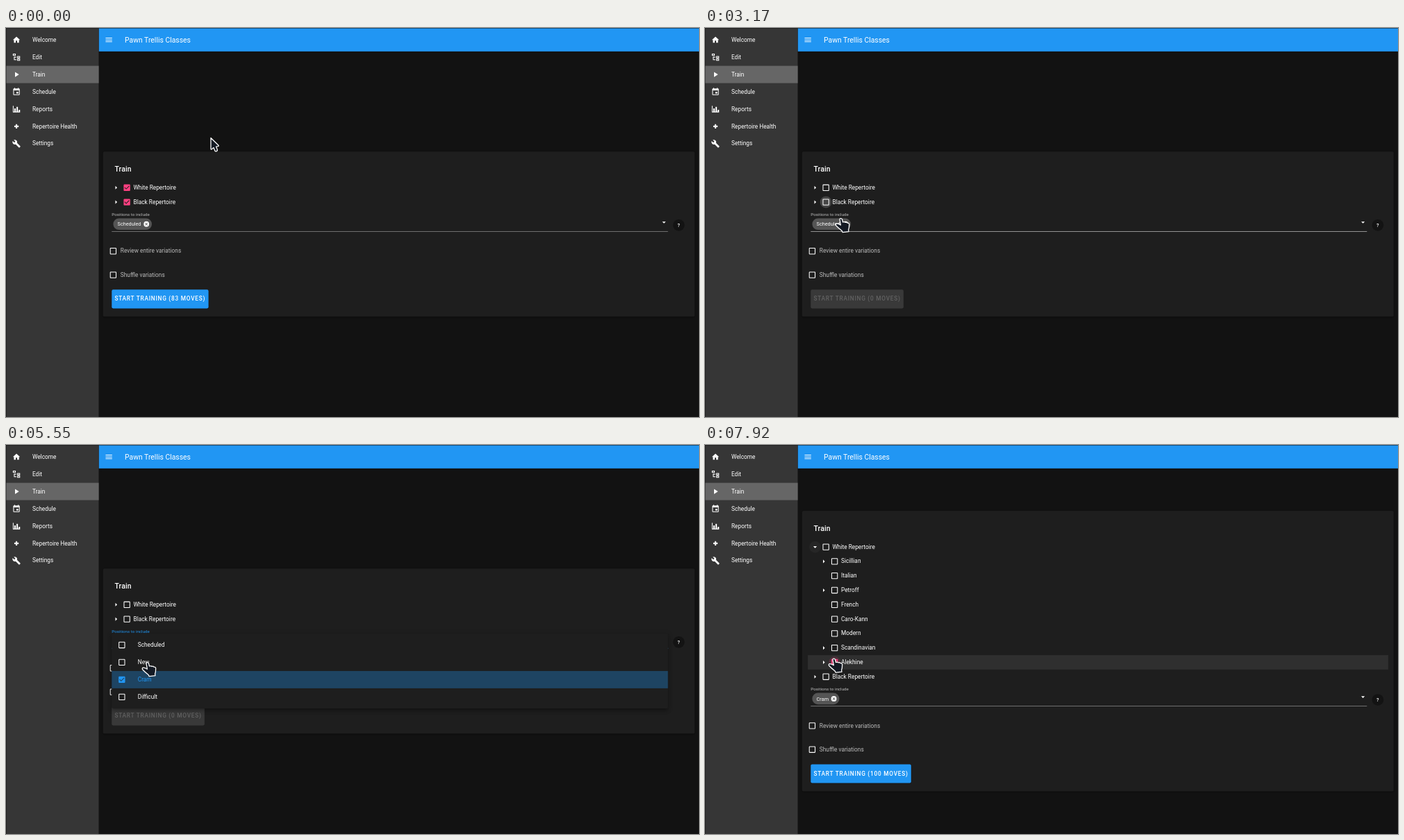
Recreate the animation shown at these times as an HTML page. Size 998 by 561 pixels, loop 8 s.

```html
<!DOCTYPE html>
<html lang="en">
<head>
<meta charset="utf-8">
<title>Train</title>
<style>
  html, body { margin: 0; width: 100%; height: 100%; overflow: hidden; background: #0c0c0c; }
  /* Interface is laid out at 1920 x 1080 and scaled to the stage */
  #app { position: absolute; left: 0; top: 0; width: 1920px; height: 1080px; transform: scale(.519792);
    transform-origin: 0 0; font: 16px/24px Roboto, sans-serif; color: #fff; }
  #app div, #app span.abs { position: absolute; white-space: nowrap; }
  svg { display: block; width: 24px; height: 24px; fill: currentColor; fill-rule: evenodd; }
  .main { left: 257px; top: 1px; width: 1663px; height: 1079px; background: #121212; }
  .drawer { left: 1px; top: 1px; width: 256px; height: 1079px; background: #363636; }
  .nav { left: 0; width: 256px; height: 48px; line-height: 48px; }
  .nav.on { background: #666; }
  .nav svg { position: absolute; left: 16px; top: 12px; }
  .nav span { position: absolute; left: 72px; }
  .bar { left: 257px; top: 1px; width: 1663px; height: 64px; background: #2196f3;
    box-shadow: 0 2px 4px -1px #0003, 0 4px 5px #0002; }
  .bar svg { position: absolute; left: 16px; top: 20px; }
  .bar span { position: absolute; left: 72px; font-size: 20px; line-height: 64px; }
  .card { left: 269px; width: 1639px; background: #1e1e1e; border-radius: 4px;
    box-shadow: 0 3px 1px -2px #0003, 0 2px 2px #0002, 0 1px 5px #0002; }
  .title { left: 32px; top: 32px; font-size: 20px; line-height: 32px; font-weight: 500; letter-spacing: .2px; }
  .row { left: 16px; width: 1608px; height: 40px; line-height: 40px; }
  .row .bg { inset: 0; background: #fff; opacity: 0; }
  .row .tog, .row .box { top: 8px; width: 24px; height: 24px; }
  .ring { inset: -3.6px; border-radius: 50%; background: currentColor; opacity: 0; }
  .row .text { top: 0; }
  .rest { left: 0; width: 1639px; height: 298px; }
  .label { left: 24px; top: 4px; font-size: 12px; line-height: 20px; }
  .chip { left: 28px; top: 25px; height: 32px; padding: 0 12px; border-radius: 16px; background: #555;
    font-size: 14px; line-height: 32px; display: flex; align-items: center; }
  .chip svg { width: 18px; height: 18px; margin: 0 -6px 0 6px; }
  .line { left: 24px; top: 61px; width: 1541px; height: 1px; background: #fff; }
  .focus { left: 24px; top: 60px; width: 1541px; height: 2px; }
  .arrow { left: 1542px; top: 23.5px; width: 24px; height: 24px; }
  .help { left: 1579px; top: 27.5px; width: 32px; height: 32px; border-radius: 50%; background: #131313;
    font-size: 14px; font-weight: 500; line-height: 32px; text-align: center; }
  .check { left: 16px; height: 24px; }
  .check span { position: absolute; left: 32px; top: 0; color: #bbb; }
  .btn { left: 24px; top: 223px; height: 52px; padding: 0 8px; border-radius: 4px; font-weight: 500;
    line-height: 52px; letter-spacing: .0892857em; background: #2196f3;
    box-shadow: 0 3px 1px -2px #0003, 0 2px 2px #0002; }
  .btn.off { background: #393939; color: #626262; box-shadow: none; }
  .menu { left: 293px; top: 523px; width: 1541px; height: 208px; border-radius: 4px; background: #1e1e1e;
    box-shadow: 0 5px 5px -3px #0003, 0 8px 10px 1px #0002, 0 3px 14px 2px #0002; }
  .item { left: 0; width: 1541px; height: 48px; line-height: 48px; }
  .item .bg { inset: 0; background: currentColor; opacity: 0; }
  .item .box { left: 16px; top: 12px; }
  .item span { position: absolute; left: 72px; }
  #cursor { position: absolute; left: 0; top: 0; width: 998px; height: 561px; }
  #cursor path { fill: #141a24; stroke: #fff; stroke-width: 1.25; stroke-linejoin: round; }
</style>
</head>
<body>
<div id="app"></div>
<svg id="cursor" viewBox="0 0 998 561">
  <path id="arrow" d="M0 .5V16.6Q.4 17.6 1.4 16.8L4 14.6L5.6 18.6Q6.6 20.6 8.4 19.6Q10 18.8 9.2 17L7.6 13L10.6 12.6Q11.8 12 10.8 11Z"/>
  <path id="hand" d="M-2 1.2Q-2.2 -.4 -.4 -.5Q1.1 -.5 1.5 1L2.5 5Q5 4.1 6 5.4Q8.2 4.8 9 6.2Q11.4 5.8 11.7 8L11.4 13L10.6 16.2L11 18.6L2.2 19.6L1.2 17.6Q-4 13.4 -7.4 9.8Q-8.4 7.8 -6.6 7.1Q-4.4 6.8 -.6 9.2Z"/>
</svg>
<script>
const SCALE = 998 / 1920, LOOP = 8000;
const BLUE = '#2196f3', PINK = '#ff4081';
const frame = 'M19 3H5a2 2 0 0 0-2 2v14a2 2 0 0 0 2 2h14a2 2 0 0 0 2-2V5a2 2 0 0 0-2-2Z';
const icons = {
  home: 'M10 20V14H14V20H19V12H22L12 3L2 12H5V20Z',
  tree: 'M12 13H7V18H12V20H5V10H7V11H12ZM8 4V6H4V4ZM10 2H2V8H10ZM20 11V13H16V11ZM22 9H14V15H22ZM20 18V20H16V18ZM22 16H14V22H22Z',
  play: 'M8 5V19L19 12Z',
  date: 'M19 19H5V8H19ZM16 1V3H8V1H6V3H5a2 2 0 0 0-2 2V19a2 2 0 0 0 2 2H19a2 2 0 0 0 2-2V5a2 2 0 0 0-2-2H18V1ZM17 12H12V17H17Z',
  chart: 'M22 21H2V3H4V19H6V10H10V19H12V6H16V19H18V14H22Z',
  plus: 'M18 14H14V18H10V14H6V10H10V6H14V10H18Z',
  wrench: 'M22.7 19L13.6 9.9C14.5 7.6 14 4.9 12.1 3C10.1 1 7.1 .6 4.7 1.7L9 6L6 9L1.6 4.7C.4 7.1 .9 10.1 2.9 12.1C4.8 14 7.5 14.5 9.8 13.6L18.9 22.7Q19.6 23.3 20.3 22.7L22.6 20.4Q23.3 19.7 22.7 19Z',
  menu: 'M3 6H21V8H3ZM3 11H21V13H3ZM3 16H21V18H3Z',
  down: 'M7 10L12 15L17 10Z',
  close: 'M12 2a10 10 0 1 0 0 20a10 10 0 1 0 0-20ZM15.6 7L12 10.6L8.4 7L7 8.4L10.6 12L7 15.6L8.4 17L12 13.4L15.6 17L17 15.6L13.4 12L17 8.4Z',
  blank: frame + 'm0 2v14H5V5Z',
  tick: frame + 'M10 17l-5-5 1.4-1.4 3.6 3.6 7.6-7.6L19 8Z'
};
const icon = name => `<svg viewBox="0 0 24 24"><path d="${icons[name]}"/></svg>`;

const nav = [['home', 'Welcome'], ['tree', 'Edit'], ['play', 'Train'], ['date', 'Schedule'],
  ['chart', 'Reports'], ['plus', 'Repertoire Health'], ['wrench', 'Settings']];
// name, depth, has children
const rows = [['White Repertoire', 0, 1], ['Sicillian', 1, 1], ['Italian', 1, 0], ['Petroff', 1, 1],
  ['French', 1, 0], ['Caro-Kann', 1, 0], ['Modern', 1, 0], ['Scandinavian', 1, 1],
  ['Alekhine', 1, 1], ['Black Repertoire', 0, 1]];
const WHITE = 0, ALEKHINE = 8, BLACK = 9;
const options = ['Scheduled', 'New', 'Cram', 'Difficult'];

const rowHtml = ([name, depth, kids]) => {
  const x = 8 + depth * 24;
  return `<div class="row"><div class="bg"></div>
    <div class="tog" style="left:${x}px"><div class="ring"></div><div class="pic">${kids ? icon('down') : ''}</div></div>
    <div class="box" style="left:${x + 30}px"><div class="ring"></div><div class="pic"></div></div>
    <div class="text" style="left:${x + 60}px">${name}</div></div>`;
};
const app = document.getElementById('app');
app.innerHTML = `
  <div class="main"></div>
  <div class="bar">${icon('menu')}<span>Pawn Trellis Classes</span></div>
  <div class="drawer">${nav.map(([pic, name], i) =>
    `<div class="nav ${i === 2 ? 'on' : ''}" style="top:${8 + i * 48}px">${icon(pic)}<span>${name}</span></div>`).join('')}</div>
  <div class="card"><div class="title">Train</div>${rows.map(rowHtml).join('')}
    <div class="rest">
      <div class="label">Positions to include</div>
      <div class="chip"><b style="font-weight:400"></b>${icon('close')}</div>
      <div class="line"></div><div class="focus"></div>
      <div class="arrow">${icon('down')}</div><div class="help">?</div>
      <div class="check" style="top:103.5px">${icon('blank')}<span>Review entire variations</span></div>
      <div class="check" style="top:169.5px">${icon('blank')}<span>Shuffle variations</span></div>
      <div class="btn"></div>
    </div></div>
  <div class="menu">${options.map((name, i) =>
    `<div class="item" style="top:${8 + i * 48}px"><div class="bg"></div><div class="box"></div><span>${name}</span></div>`).join('')}</div>`;

const $ = q => app.querySelector(q);
const card = $('.card'), rest = $('.rest'), label = $('.label'), chip = $('.chip'), chipText = $('.chip b'),
  line = $('.line'), focusLine = $('.focus'), arrow = $('.arrow'), btn = $('.btn'), menu = $('.menu');
const rowEls = [...app.querySelectorAll('.row')].map(el => ({
  el, bg: el.querySelector('.bg'),
  tog: el.querySelector('.tog .pic'), togRing: el.querySelector('.tog .ring'),
  box: el.querySelector('.box'), pic: el.querySelector('.box .pic'), ring: el.querySelector('.box .ring')
}));
const items = [...app.querySelectorAll('.item')].map(el => ({
  el, bg: el.querySelector('.bg'), box: el.querySelector('.box')
}));

const clamp = v => Math.max(0, Math.min(1, v));
const out = (t, from, power) => 1 - (1 - clamp((t - from) / 300)) ** power;
const mix = (k, rest) => `color-mix(in srgb, ${BLUE} ${(k * 100).toFixed(1)}%, ${rest})`;
const pulse = (t, from, to) => clamp((t - from) / 150) - clamp((t - to) / 150);

// time, x, y, 1 = linear on the way to the next point
const path = [[0, 295, 158], [430, 295, 158], [1170, 179.5, 222.5], [1490, 179.5, 222.5],
  [1550, 177, 223.3], [1650, 177, 223.3], [1800, 175.3, 224.5], [1980, 175.3, 224.5],
  [2380, 174.5, 247], [2720, 174.5, 247], [3170, 196, 275], [3260, 196, 275], [3420, 203, 281.5],
  [4300, 203, 281.5], [4590, 203, 305.5], [4770, 203, 305.5], [4880, 210.5, 344],
  [5400, 210.5, 344, 1], [5550, 204, 314, 1], [6050, 165, 232.5], [6130, 162, 230],
  [6260, 162, 230], [6340, 160, 229], [6660, 160, 229, 1], [7090, 169, 295.5, 1],
  [7380, 186, 308.5], [LOOP, 186, 308.5]];
function tip(t) {
  let i = 0;
  while (i < path.length - 2 && t >= path[i + 1][0]) i++;
  const [t0, x0, y0, linear] = path[i], [t1, x1, y1] = path[i + 1];
  let p = clamp((t - t0) / (t1 - t0));
  if (!linear) p = p * p * (3 - 2 * p);
  return [x0 + (x1 - x0) * p, y0 + (y1 - y0) * p];
}

const OPEN = 6455;
const shown = (i, t) => t >= OPEN || !rows[i][1];
function target(t) {
  const y = tip(t)[1] / SCALE, top = t >= OPEN ? 263 : 423;
  const list = rows.map((_, i) => i).filter(i => shown(i, t));
  const n = Math.floor((y - top) / 40);
  if (n >= 0 && n < list.length) return list[n];
  return n >= 0 && y < top + list.length * 40 + 62 ? 'field' : null;
}

function setBox(el, on, color) {
  el.style.color = on ? color : '#fff';
  const html = icon(on ? 'tick' : 'blank');
  if (el.dataset.on !== String(on)) { el.dataset.on = on; return html; }
}

function draw(t) {
  const open = t >= OPEN, count = open ? 10 : 2;
  card.style.top = (open ? 183 : 343) + 'px';
  card.style.height = 378 + count * 40 + 'px';
  rest.style.top = 80 + count * 40 + 'px';

  // hover fades over 200 ms
  const hover = {};
  for (let k = 0; k < 10; k++) {
    const id = target(Math.max(0, t - k * 20));
    hover[id] = (hover[id] || 0) + .1;
  }
  const checked = { [WHITE]: t < 1920, [BLACK]: t < 2700, [ALEKHINE]: t >= 7900 };
  const rings = { [WHITE]: pulse(t, 1830, 2630), [BLACK]: pulse(t, 2630, 3630), [ALEKHINE]: 1.6 * pulse(t, 7840, 9000) };
  let n = 0;
  rowEls.forEach((r, i) => {
    const on = shown(i, t);
    r.el.style.display = on ? '' : 'none';
    if (on) r.el.style.top = 80 + 40 * n++ + 'px';
    r.bg.style.opacity = .075 * (hover[i] || 0);
    r.tog.style.transform = open && i === WHITE ? '' : 'rotate(-90deg)';
    const html = setBox(r.box, !!checked[i], PINK);
    if (html) r.pic.innerHTML = html;
    r.ring.style.opacity = .18 * (rings[i] || 0);
    r.togRing.style.opacity = i === WHITE ? .2 * pulse(t, 6300, 7800) : 0;
  });

  const focus = out(t, 3640, 3) - out(t, OPEN, 3);
  const menuOn = out(t, 4250, 4) - out(t, OPEN, 4);
  label.style.color = mix(focus, '#bbb');
  arrow.style.color = mix(focus, '#fff');
  arrow.style.transform = `rotate(${180 * (out(t, 4250, 3) - out(t, OPEN, 3))}deg)`;
  line.style.opacity = .7 + .3 * (hover.field || 0);
  focusLine.style.transform = `scaleX(${focus})`;
  focusLine.style.background = mix(focus, '#bde0fa');
  const tag = t < 3680 ? 'Scheduled' : t >= 5400 ? 'Cram' : '';
  chip.style.display = tag ? '' : 'none';
  chipText.textContent = tag;

  const moves = t < 1920 ? 83 : t < 2700 ? 34 : t < 7900 ? 0 : 100;
  btn.textContent = `START TRAINING (${moves} MOVES)`;
  btn.className = moves ? 'btn' : 'btn off';

  menu.style.opacity = menuOn;
  const slide = clamp((t - 4800) / 80), pick = t >= 5400;
  const shade = [0, .08 * clamp((t - 4480) / 120) - .035 * slide - .045 * clamp((t - 5250) / 150),
    pick ? .25 + .07 * clamp((t - 5400) / 120) : .045 * slide, 0];
  items.forEach((item, i) => {
    const on = pick && i === 2;
    item.el.style.color = on ? BLUE : '#fff';
    item.bg.style.opacity = shade[i];
    const html = setBox(item.box, on, BLUE);
    if (html) item.box.innerHTML = html;
  });

  const [x, y] = tip(t), pointing = y > 219;
  for (const [id, on] of [['arrow', !pointing], ['hand', pointing]]) {
    const el = document.getElementById(id);
    el.style.display = on ? '' : 'none';
    el.setAttribute('transform', `translate(${x} ${y})`);
  }
}

let start;
function tick(now) {
  start ??= now;
  draw((now - start) % LOOP);
  requestAnimationFrame(tick);
}
draw(0);
requestAnimationFrame(tick);
</script>
</body>
</html>
```
